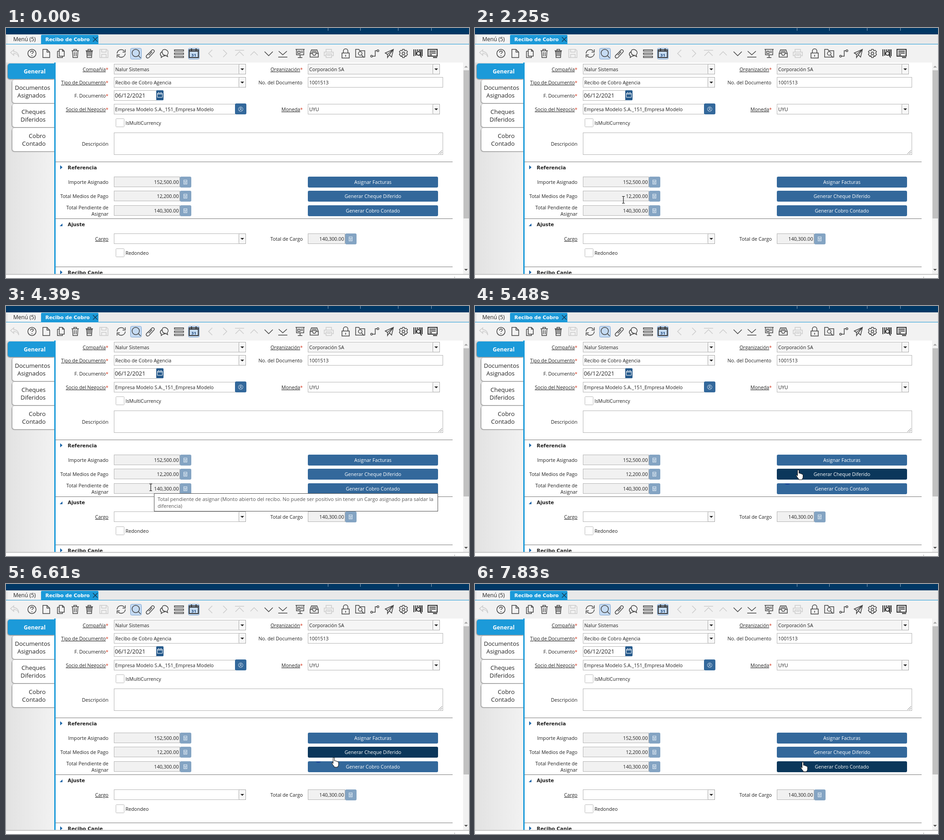
An HTML page that plays this animation: 1017x550 px, repeating every 8 s.

```html
<!DOCTYPE html>
<html lang="es">
<head>
<meta charset="utf-8">
<title>Recibo de Cobro</title>
<style>
html, body { margin: 0; width: 100%; height: 100%; overflow: hidden; background: #fff; }
svg { display: block; width: 1017px; height: 550px; }
text { font: 10.667px "Open Sans", "Noto Sans", sans-serif; fill: #222; }
.b { font: bold 10.6px "DejaVu Sans", sans-serif; }
.side { font-size: 13px; }
.tip { font-size: 11px; fill: #575757; }
.btn { fill: #fff; }
.u { text-decoration: underline; }
.i { fill: none; stroke: #444; stroke-width: 1.5; }
.off { stroke: #ccc; }
.heavy { stroke: #333; stroke-width: 2.1; }
</style>
</head>
<body>
<svg id="stage" viewBox="0 0 1017 550"></svg>
<script>
const rect = (x, y, w, h, fill, more = '') =>
  `<rect x="${x}" y="${y}" width="${w}" height="${h}" fill="${fill}" ${more}/>`;
const path = (d, more = '') => `<path d="${d}" ${more}/>`;
const text = (x, y, s, more = '') => `<text x="${x}" y="${y}" ${more}>${s}</text>`;
const END = 'text-anchor="end"', MID = 'text-anchor="middle"';
const BLUE = '#33689b', HOVER = '#0b375b', SKY = '#1b9ad9';

const box = (x, y, w, h, fill = '#fff') =>
  rect(x + .5, y + .5, w - 1, h - 1, fill, 'stroke="#b4b4b4"');

function label(x, y, s, link, must) {
  const star = must ? '<tspan fill="#d33a22">*</tspan>' : '';
  return text(x, y, `<tspan class="${link ? 'u' : ''}">${s}</tspan>${star}`, END);
}

function combo(x, y, w, s, fill = '#fff') {
  const bx = x + w - 16;
  return box(x, y, w, 23, fill) +
    rect(bx + .5, y + .5, 15, 22, '#f7f7f7', 'rx="2" stroke="#aaa"') +
    path(`M${bx + 4} ${y + 10}h8l-4 4z`, 'fill="#222"') +
    text(x + 3, y + 16, s);
}

function amount(x, y, w, s) {
  const bx = x + w;
  return box(x, y, w, 23, '#f1f1f1') + text(bx - 2.5, y + 16, s, END) +
    rect(bx, y, 25, 24, '#84a4c3', 'rx="3"') +
    rect(bx + 8.5, y + 7.5, 7, 9, 'none', 'stroke="#e4edf5"') +
    path(`M${bx + 9} ${y + 10.5}h6M${bx + 10} ${y + 12.5}h4M${bx + 10} ${y + 14.5}h4`, 'stroke="#e4edf5" fill="none"');
}

const check = (y, s) => rect(241.5, y + .5, 18, 18, '#fff', 'rx="1" stroke="#b8b8b8"') + text(262.5, y + 14, s);
const rule = y => rect(109, y, 872, 1, '#777');
const opener = (y, open) => path(open ? `M118 ${y + 4}h6v-6z` : `M119 ${y - 5}v9l5-4.5z`, 'fill="#1763a6"');

function group(y, s, open) {
  return rule(y) + opener(y + 13, open) + text(135.5, y + 17, s, 'class="b"');
}

function sideTab(y, rows) {
  return rect(14, y, 98, 51, '#fff', 'rx="5" filter="url(#shade)"') +
    rows.map(([s, x], i) => text(x, y + 22 + i * 17, s, `class="side" ${END}`)).join('');
}

// Toolbar drawings are centred on their own origin.
const bin = 'M-8-6H8M-3-6v-3h6v3M-6-6l1 15H5l1-15';
const icons = [
  [19, 'M-2-8L-9-2l7 6V0c6 0 9 2 11 8C9 0 4-4-2-4z', 'off'],
  [57, 'M-9 0a9 9 0 1 0 18 0a9 9 0 1 0-18 0M-3-2c0-5 6-4 6-1c0 2-3 2-3 4M0 4v2'],
  [88, 'M-7-9H2l6 6V9H-7zM2-9v6h6'],
  [120, 'M-7-5V9H4V6M-3-9H4l4 4V6H-3zM4-9v4h4M-3-5h-4'],
  [152, bin + 'M-2-3V6M2-3V6'],
  [183, bin + 'M-3-3V6M0-3V6M3-3V6M-7-4H7'],
  [215, 'M-9-9H6l3 3V9H-9zM-5-9v6H5v-6M-5 9V2H5V9', 'off'],
  [253, 'M-9 0a9 9 0 0 1 16-5M9-9v6H3M9 0a9 9 0 0 1-16 5M-9 9V3h6'],
  [286, 'M-9-1a8 8 0 1 0 16 0a8 8 0 1 0-16 0M5 5l5 5'],
  [317, 'M-6 3L3-7c3-3 8 1 5 4L-3 9c-4 3-8-1-5-5L2-5M-3 4l7-8'],
  [348, 'M-3-8C5-11 12-2 6 3l1 4-5-3C-6 4-6-6-3-8M-5-4c-5 2-5 8-2 9v4l4-3 5-1'],
  [380, 'M-10-8H10v3H-10zM-10-1H10v3H-10zM-10 6H10v3H-10z'],
  [412.5, 'M-10-8H10V9H-10zM-10-5H10M-5-11v5M5-11v5', 'heavy'],
  [449, 'M4-8L-4 0l8 8', 'off'], [481, 'M-4-8L4 0l-8 8', 'off'],
  [513, 'M-10-7H10M-9 5L0-4L9 5', 'off'], [545, 'M-8 4L0-4L8 4', 'off'],
  [577, 'M-9-4L0 5L9-4'], [608, 'M-9-5L0 3L9-5M-10 8H10'],
  [646, 'M-10-9H10M-8-9V3H8V-9M0 3v6M-5 9H5M-5-5h5v5h-5zM2-5h4M2-2h4'],
  [677, 'M-9 0L-6-8H6L9 0v8H-9zM-9 0h5l2 4h4l2-4h5M-5-5H5M-6-2H6'],
  [709, 'M-6-3v-6H6v6M-6 5h-4V-3h20V5H6M-6 1H6v8H-6zM-4 4h8', 'off'],
  [746, 'M-8-1H8V10H-8zM-5-1v-4c0-7 10-7 10 0v4M0 3v4'],
  [778, 'M-10 8V-9h7l2 3h11V8zM-4 0a4 4 0 1 0 8 0a4 4 0 1 0-8 0M3 3l5 6'],
  [810, 'M-9 6a2 2 0 1 0 4 0a2 2 0 1 0-4 0M5-6a2 2 0 1 0 4 0a2 2 0 1 0-4 0M-5 6h6v-12h4'],
  [842, 'M-9-1L9-9L5 8L0 3l-4 6v-7zM-4 2L9-9L0 3'],
  [873, 'M-3 0a3 3 0 1 0 6 0a3 3 0 1 0-6 0M-2-9h4l1 3 3-1 3 3-2 3 2 3-3 4-3-1-1 4h-4l-1-4-3 1-3-4 2-3-2-3 3-3 3 1z'],
  [905, 'M-9-9V6M-5-9V5M-1-9v4M3-9v4M6-9V5M9-9V6M-3 0a4 4 0 1 0 8 0a4 4 0 1 0-8 0M4 3l4 6', 'heavy'],
  [937, 'M-10-9H10V6H-10zM-7-5H7M-7-1H7M-7 3h6M1 9h9', 'heavy']
];

function toolbar() {
  let s = rect(0, 36, 1017, 40, '#f2f2f2');
  for (const x of [273.5, 400.5])
    s += rect(x, 44.5, 24, 24, '#c5dbf3', 'rx="3" stroke="#7ba3d0"');
  for (const [x, d, kind = ''] of icons)
    s += path(d, `class="i ${kind}" transform="translate(${x} 56)"`);
  return s + text(412.5, 63, '31', `style="font-size:9.5px;font-weight:bold;fill:#244d7d" ${MID}`);
}

function header() {
  return rect(0, 0, 1017, 14, '#003764') +
    [707, 778, 861, 934].map(x => rect(x, 0, 1, 6, '#8ba4b9')).join('') +
    rect(0, 14, 1017, 22, '#e9e9e9') + rect(4, 16, 72, 19, '#f3f3f3') +
    text(16, 29, 'Menú (5)', 'style="font-size:12px"') +
    rect(77, 15, 126, 21, SKY, 'rx="2"') + rect(0, 35, 1017, 1, SKY) +
    text(86.5, 29, 'Recibo de Cobro', 'class="b" style="fill:#fff"') +
    path('M191 20l10 10M201 20l-10 10', 'stroke="#17384f" stroke-width="1.4"');
}

function side() {
  return rect(0, 76, 106, 466, 'url(#panel)') +
    sideTab(114, [['Documentos', 97], ['Asignados', 87]]) +
    sideTab(167, [['Cheques', 87], ['Diferidos', 87]]) +
    sideTab(220, [['Cobro', 87], ['Contado', 87]]) +
    rect(4, 78, 106, 34, SKY, 'rx="5" filter="url(#shade)"') +
    text(87, 100, 'General', `${END} style="font-size:12.3px;font-weight:bold;fill:#fff"`) +
    rect(109, 76, 908, 466, '#fff') + rect(106, 76, 3, 466, SKY);
}

function form() {
  return label(225, 95, 'Compañía', 1, 1) + combo(237, 79, 290, 'Nalur Sistemas', '#f5f5f5') +
    label(652, 95, 'Organización', 1, 1) + combo(663, 79, 290, 'Corporación SA', '#f5f5f5') +
    label(225, 124, 'Tipo de Documento', 1, 1) + combo(237, 108, 290, 'Recibo de Cobro Agencia') +
    label(651, 124, 'No. del Documento') + box(663, 108, 297, 23) + text(666, 124, '1001513') +
    label(225, 153, 'F. Documento', 0, 1) + box(237, 137, 94, 23) +
    text(239, 153, '06/12/2021', 'style="font-size:12.67px"') +
    rect(330, 137, 16, 22, '#265a8c', 'rx="2"') +
    path('M332.5 143.5h11v9h-11zM332 145.5h12M335.5 141v3M340.5 141v3', 'fill="none" stroke="#fff"') +
    label(225, 183, 'Socio del Negocio', 1, 1) + box(237, 167, 267, 23) +
    text(239.5, 183, 'Empresa Modelo S.A._151_Empresa Modelo') +
    rect(503, 166, 25, 24, BLUE, 'rx="3"') +
    '<g fill="none" stroke="#cddceb"><circle cx="515.5" cy="178.5" r="5"/><circle cx="515.5" cy="177" r="1.7"/><path d="M512.5 182c1-3 5-3 6 0"/></g>' +
    label(652, 183, 'Moneda', 1, 1) + combo(663, 167, 290, 'UYU') +
    check(199, 'IsMultiCurrency') +
    label(225, 259, 'Descripción') + box(237, 230, 723, 49) +
    path('M950 277l8-8M954 277l4-4', 'stroke="#777"') +
    group(294, 'Referencia') +
    label(225, 343, 'Importe Asignado') + amount(237, 327, 145, '152,500.00') +
    label(225, 374, 'Total Medios de Pago') + amount(237, 358, 145, '12,200.00') +
    label(225, 399, 'Total Pendiente de') + label(225, 413, 'Asignar') +
    amount(237, 390, 145, '140,300.00') +
    group(419, 'Ajuste', 1) +
    label(225, 468, 'Cargo', 1) + combo(237, 452, 290, '') +
    label(652, 468, 'Total de Cargo') + amount(663, 452, 82, '140,300.00') +
    check(485, 'Redondeo') + group(525, 'Recibo Canje');
}

const buttons = [[327, 'Asignar Facturas'], [358, 'Generar Cheque Diferido'], [390, 'Generar Cobro Contado']];

function frame() {
  return rect(1004, 76, 13, 466, '#f1f1f1') + rect(1005, 93, 12, 326, '#c1c1c1') +
    path('M1006.5 87h8l-4-4z', 'fill="#a3a3a3"') + path('M1006.5 530h8l-4 4z', 'fill="#505050"') +
    rect(0, 541, 1017, 9, '#fff') + rect(0, 541, 1017, 2, '#c6c6c6') + rect(985, 547, 1, 3, '#aaa');
}

const tip = `<g id="tip">${rect(325.5, 412.5, 623, 39, '#fff', 'stroke="#4d4d4d"')}` +
  text(333, 429, 'Total pendiente de asignar (Monto abierto del recibo. No puede ser positivo sin tener un Cargo asignado para saldar la', 'class="tip"') +
  text(333, 444, 'diferencia)', 'class="tip"') + '</g>';

const cursors = '<g id="cursor">' +
  path('M.5.5v16l3.7-3.5 2.6 5.6 2.3-1-2.5-5.4h5z', 'id="arrow" fill="#fff" stroke="#111"') +
  path('M-3-7.5h2.5l.5.5.5-.5H3M0-7V7M-3 7.5h2.5L0 7l.5.5H3', 'id="beam" fill="none" stroke="#111" stroke-width="1.2"') +
  path('M-1.5 14V2q0-1.500 1.500-1.500t1.500 1.500V8q3-1 3.500 1 2.500-.8 3 1 2.500-.3 2.500 2v4q0 3-2 5v1H1v-1.500q-2-2-5.500-7.500q0-2.500 3 .5', 'id="hand" fill="#fff" stroke="#111" transform="translate(1 0)"') +
  '</g>';

const $ = id => document.getElementById(id);
$('stage').innerHTML =
  `<defs><linearGradient id="panel"><stop stop-color="#e2e2e2"/><stop offset="1" stop-color="#f2f2f2"/></linearGradient>
  <filter id="shade" x="-10%" y="-10%" width="120%" height="130%"><feDropShadow dx="-1" dy="1" stdDeviation="1.3" flood-color="#555" flood-opacity=".75"/></filter></defs>` +
  rect(0, 0, 1017, 550, '#fff') + side() + header() + toolbar() + form() +
  buttons.map(([y, s], i) => rect(663, y, 286, 24, BLUE, `id="btn${i}" rx="3"`) +
    text(806, y + 16, s, `class="btn" ${MID}`)).join('') +
  path('M680 391h12q-2 2-6 2t-6-2z', 'id="spot" fill="#1b3f98"') +
  frame() + tip + cursors;

// Bursts of pointer travel: start, end, steps, waypoints.
const moves = [
  [550, 690, 3, [1020, 552], [976, 532], [1020, 552]],
  [960, 1160, 4, [1020, 552], [640, 480], [442, 437]],
  [1750, 2520, 12, [442, 437], [395, 408], [345, 380], [317, 377], [318, 398]],
  [2590, 3370, 12, [318, 398], [312, 394], [384, 416], [389, 411], [377, 388]],
  [3440, 3790, 6, [377, 388], [345, 377], [318, 399]],
  [5130, 5480, 6, [318, 399], [490, 374], [709, 360]],
  [5540, 5740, 3, [709, 360], [710, 358]],
  [6200, 6610, 7, [710, 358], [719, 381]],
  [6680, 6960, 4, [719, 381], [718, 392]],
  [7720, 7830, 2, [718, 392], [719, 391]]
];

function pose(t) {
  let at = [1020, 552];
  for (const [from, to, n, ...pts] of moves) {
    if (t < from) break;
    const step = Math.min(n, Math.floor((t - from) / (to - from) * (n - 1) + 1e-6) + 1);
    const u = step / n * (pts.length - 1);
    const k = Math.min(Math.floor(u), pts.length - 2);
    at = pts[k].map((v, j) => Math.round(v + (pts[k + 1][j] - v) * (u - k)));
  }
  return at;
}

const inRow = y => buttons.findIndex(([top]) => y >= top && y < top + 24);
const show = (id, on) => $(id).setAttribute('visibility', on ? 'visible' : 'hidden');

function draw(t) {
  const [x, y] = pose(t), row = inRow(y);
  const hot = x >= 663 && x < 949 ? row : -1;
  const beam = row >= 0 && x >= 237 && x < 382;
  $('cursor').setAttribute('transform', `translate(${x} ${y})`);
  show('beam', beam);
  show('hand', hot >= 0);
  show('arrow', !beam && hot < 0);
  buttons.forEach((_, i) => $('btn' + i).setAttribute('fill', i === hot ? HOVER : BLUE));
  show('tip', t >= 4390 && t < 5130);
  show('spot', t >= 5410 && t < 6960 && hot !== 2);
}

const start = performance.now();
function tick() {
  draw((performance.now() - start) % 8000);
  requestAnimationFrame(tick);
}
tick();
</script>
</body>
</html>
```
